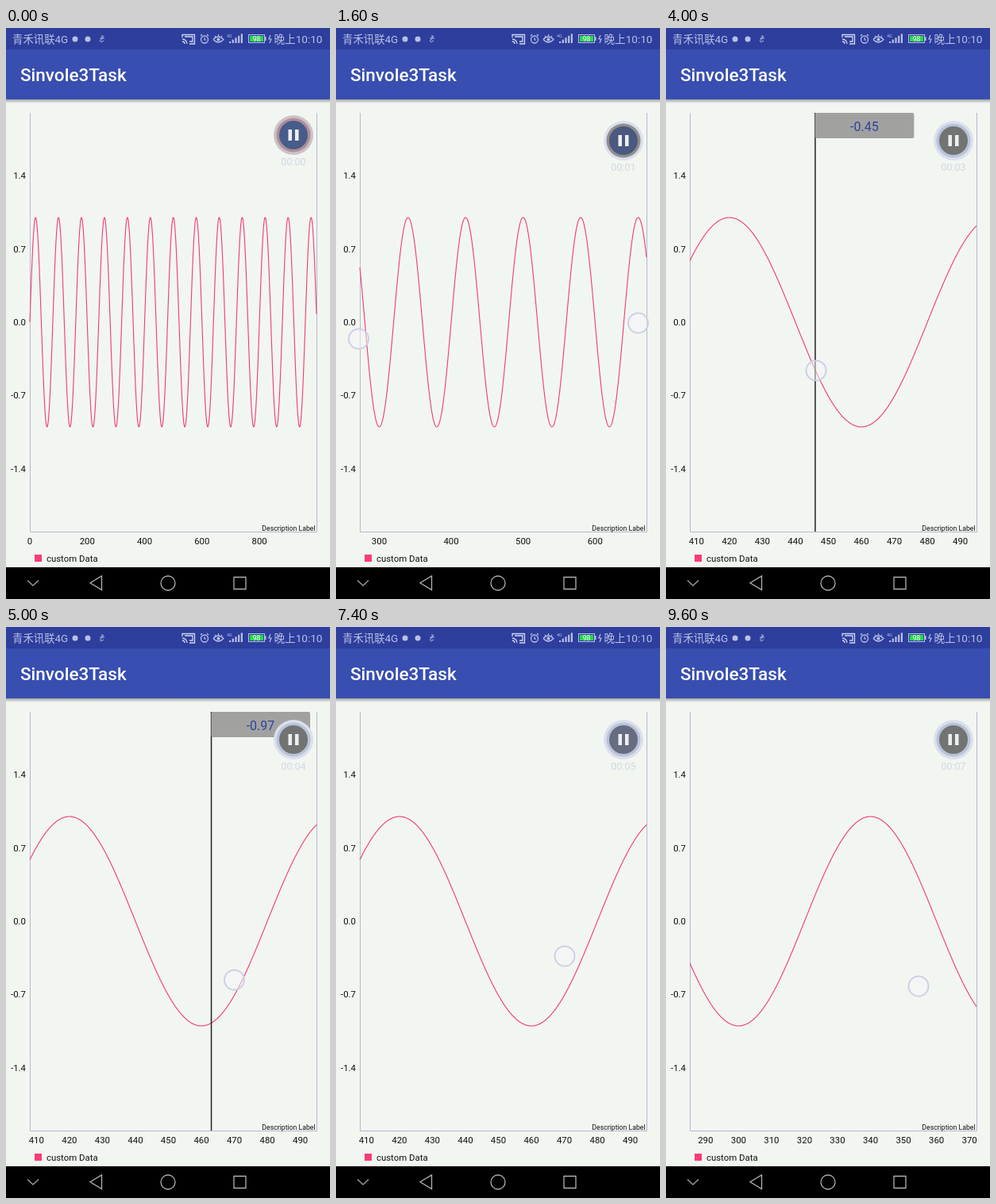
These frames come from a looping animation (408 by 720 pixels, 9800 ms). An HTML page with a canvas:

```html
<!DOCTYPE html>
<html lang="en">
<head>
<meta charset="utf-8">
<title>Sine chart</title>
<style>
  html, body { margin: 0; width: 100%; height: 100%; overflow: hidden; background: #f2f6f1; }
  canvas { display: block; }
</style>
</head>
<body>
<canvas id="stage" width="408" height="720"></canvas>
<script>
const ctx = document.getElementById('stage').getContext('2d');
const LOOP = 9800, STEP = 200, TAU = Math.PI * 2;
const chart = { left: 30, right: 391, top: 107, bottom: 635, mid: 371, unit: 132 };
const chartWidth = chart.right - chart.left;

// Each pinch zooms from the previous view to [left, span].
const pinches = [
  { start: 600, end: 1600, to: [273, 398.5], y: [392, 372] },
  { start: 1800, end: 2600, to: [378.8, 155.8], y: [395, 390] },
  { start: 2800, end: 3400, to: [408, 86.9], y: [395, 390] }
];
const swipes = [
  { start: 7600, end: 8400, from: 120, to: 372 },
  { start: 8800, end: 9600, from: 60, to: 318 }
];
const dragPath = [[3600, 188, 430], [3800, 188, 430], [4000, 189, 432], [4600, 230, 440],
  [5400, 345, 450], [5800, 338, 452], [6000, 334, 452], [7000, 290, 420], [7400, 288, 415]];

const clamp = v => Math.max(0, Math.min(1, v));
const ease = v => v * v * (3 - 2 * v);
const mix = (a, b, p) => a + (b - a) * p;
const progress = (t, g) => ease(clamp((t - g.start) / (g.end - g.start)));
const active = (t, g) => t >= g.start && t <= g.end;
const wave = x => Math.sin(x * Math.PI / 40);

function follow(path, t) {
  const i = Math.max(1, path.findIndex(k => k[0] >= t));
  const a = path[i - 1], b = path[i], p = clamp((t - a[0]) / (b[0] - a[0]));
  return [mix(a[1], b[1], p), mix(a[2], b[2], p)];
}

function scene(t) {
  const touches = [];
  let left = 0, span = 999;
  for (const g of pinches) {
    if (t < g.start) break;
    const [toLeft, toSpan] = g.to;
    const gap0 = 352 * toSpan / span;
    const gap = mix(gap0, 352, progress(t, g));
    const next = span * gap0 / gap;
    left += (span - next) * (toLeft - left) / (span - toSpan);
    span = next;
    if (active(t, g)) touches.push([204.5 - gap / 2, g.y[0]], [204.5 + gap / 2, g.y[1]]);
  }
  for (const g of swipes) {
    const p = progress(t, g), x = mix(g.from, g.to, p);
    left -= (x - g.from) * span / chartWidth;
    if (active(t, g)) touches.push([x, mix(440, 453, p)]);
  }
  if (t >= 3800 && t <= 7400) touches.push(follow(dragPath, t));
  let mark = null;
  if (t >= 3800 && t < 7200) {
    const x = follow(dragPath, t - STEP)[0];
    mark = Math.round(left + (x - chart.left) * span / chartWidth);
  }
  return { left, span, touches, mark };
}

function text(str, x, y, size, color, align = 'left', weight = 400) {
  ctx.font = `${weight} ${size}px Roboto, "Noto Sans CJK SC", "Noto Sans CJK", sans-serif`;
  ctx.fillStyle = color;
  ctx.textAlign = align;
  ctx.fillText(str, x, y);
}

function rect(x, y, w, h, color) {
  ctx.fillStyle = color;
  ctx.fillRect(x, y, w, h);
}

function disc(x, y, r, color) {
  ctx.fillStyle = color;
  ctx.beginPath();
  ctx.arc(x, y, r, 0, TAU);
  ctx.fill();
}

function stroke(path, color, width = 1) {
  ctx.strokeStyle = color;
  ctx.lineWidth = width;
  ctx.stroke(new Path2D(path));
}

function ring(x, y, r, color, width) {
  ctx.strokeStyle = color;
  ctx.lineWidth = width;
  ctx.beginPath();
  ctx.arc(x, y, r, 0, TAU);
  ctx.stroke();
}

function drawBars() {
  const pale = '#b9c0e4';
  const shadow = ctx.createLinearGradient(0, 90, 0, 95);
  shadow.addColorStop(0, '#0005');
  shadow.addColorStop(1, '#0000');
  rect(0, 90, 408, 5, shadow);
  rect(0, 0, 408, 27, '#2d3e9d');
  rect(0, 27, 408, 63, '#384eb0');
  text('Sinvole3Task', 18, 67, 22.5, '#fff', 'left', 500);

  text('青禾讯联4G', 8, 19, 13.4, pale);
  disc(87, 14, 3.5, pale);
  disc(103, 14, 3.5, pale);
  stroke('M118 17l5 -7M118 13h6M119 18l4 -2M121 9v3', pale);
  stroke('M222 12V8.500H237.500V20H231M222 14a6 6 0 0 1 6 6M222 17a3 3 0 0 1 3 3M225 11h10v6h-4', '#d0d6ee', 1.3);
  ring(250, 14.5, 4.5, pale, 1.3);
  stroke('M250 12v3h2M245 10l2 -2M255 10l-2 -2', pale, 1.2);
  stroke('M261 14.500q6 -7 13 0q-6.500 7 -13 0M263 10l1 1M267.500 8v2M272 10l-1 1', pale, 1.3);
  disc(267.5, 14.5, 2, pale);
  text('4G', 278, 12, 5.5, pale);
  for (let i = 0; i < 5; i++) rect(281 + i * 3.7, 17 - i * 2.4, 2.2, 2 + i * 2.4, pale);
  ctx.strokeStyle = pale;
  ctx.lineWidth = 1;
  ctx.strokeRect(305.5, 8.5, 20, 10);
  rect(307, 10, 17, 7, '#28d84c');
  rect(326, 11, 1.5, 5, pale);
  text('98', 315.5, 17, 8.5, '#fff', 'center');
  stroke('M333 9l-2 5h3l-2 5', pale, 1.2);
  text('晚上10:10', 398.5, 19, 13.6, pale, 'right');

  rect(0, 680, 408, 40, '#000');
  stroke('M27 696.500L34 703L41 696.500', '#9a9a9a', 1.4);
  stroke('M120.500 691V708.500L106 699.700Z', '#b0b0b0', 1.3);
  ring(204, 700, 9, '#b0b0b0', 1.3);
  stroke('M287 692.500H302V707.500H287Z', '#b0b0b0', 1.3);
}

function tickInterval(span) {
  const raw = span / 6;
  const scale = 10 ** Math.floor(Math.log10(raw));
  const digit = Math.round(raw / scale);
  return (digit > 5 ? 10 : digit) * scale;
}

function drawChart({ left, span, mark }) {
  const toX = v => chart.left + (v - left) * chartWidth / span;
  const ink = '#111';

  stroke('M30.500 107V635.500H391.500V107', '#b3b9ce');
  for (let i = -2; i <= 2; i++) {
    const v = i * 0.7;
    text(v.toFixed(1), 25, chart.mid - v * chart.unit + 4, 11.4, ink, 'right');
  }
  const gap = tickInterval(span);
  for (let v = Math.ceil(left / gap) * gap; v <= left + span; v += gap) {
    text(v, toX(v), 650.5, 11.4, ink, 'center');
  }

  ctx.beginPath();
  for (let x = chart.left; x <= chart.right; x += 0.25) {
    const v = left + (x - chart.left) * span / chartWidth;
    ctx.lineTo(x, chart.mid - wave(v) * chart.unit);
  }
  ctx.strokeStyle = '#f23f78';
  ctx.lineWidth = 1.15;
  ctx.stroke();

  rect(36, 664, 9, 9, '#f93c76');
  text('custom Data', 51, 673, 11.4, ink);
  text('Description Label', 389.5, 633.5, 8.7, ink, 'right');

  if (mark !== null) {
    const x = toX(mark);
    rect(x - 0.7, chart.top, 1.5, chart.bottom - chart.top, '#222');
    ctx.fillStyle = '#a1a2a0';
    ctx.beginPath();
    ctx.roundRect(x, chart.top, 124.5, 32, 2);
    ctx.fill();
    text(wave(mark).toFixed(2), x + 62, 129.5, 16, '#3140a0', 'center');
  }
}

function drawRecorder(t) {
  const y = mix(135, 142, clamp(t / 600));
  const early = t < 800;
  const core = early ? '#465c8b' : t < 2000 ? '#4b587f' : t >= 6800 && t < 8000 ? '#686c80' : '#727472';
  disc(362, y, 25, early ? '#cbc3c9' : '#dcdfeb');
  disc(362, y, 21.5, early ? '#b08e98' : t < 2000 ? '#8e8f8e' : '#b9c3da');
  disc(362, y, 18, core);
  rect(355.5, y - 7, 4.5, 14, '#eceff2');
  rect(364, y - 7, 4.5, 14, '#eceff2');
  const seconds = Math.floor(0.0007 * t + 0.81);
  text('00:0' + seconds, 362, y + 38, 12.6, '#d2d7df', 'center');
}

function draw() {
  const t = Math.floor(performance.now() % LOOP / STEP) * STEP;
  const state = scene(t);
  rect(0, 0, 408, 720, '#f2f6f1');
  drawBars();
  drawChart(state);
  drawRecorder(t);
  for (const [x, y] of state.touches) {
    disc(x, y, 12.5, '#f4f6f880');
    ring(x, y, 12.5, '#cdd0e5', 2);
  }
  requestAnimationFrame(draw);
}
draw();
</script>
</body>
</html>
```
